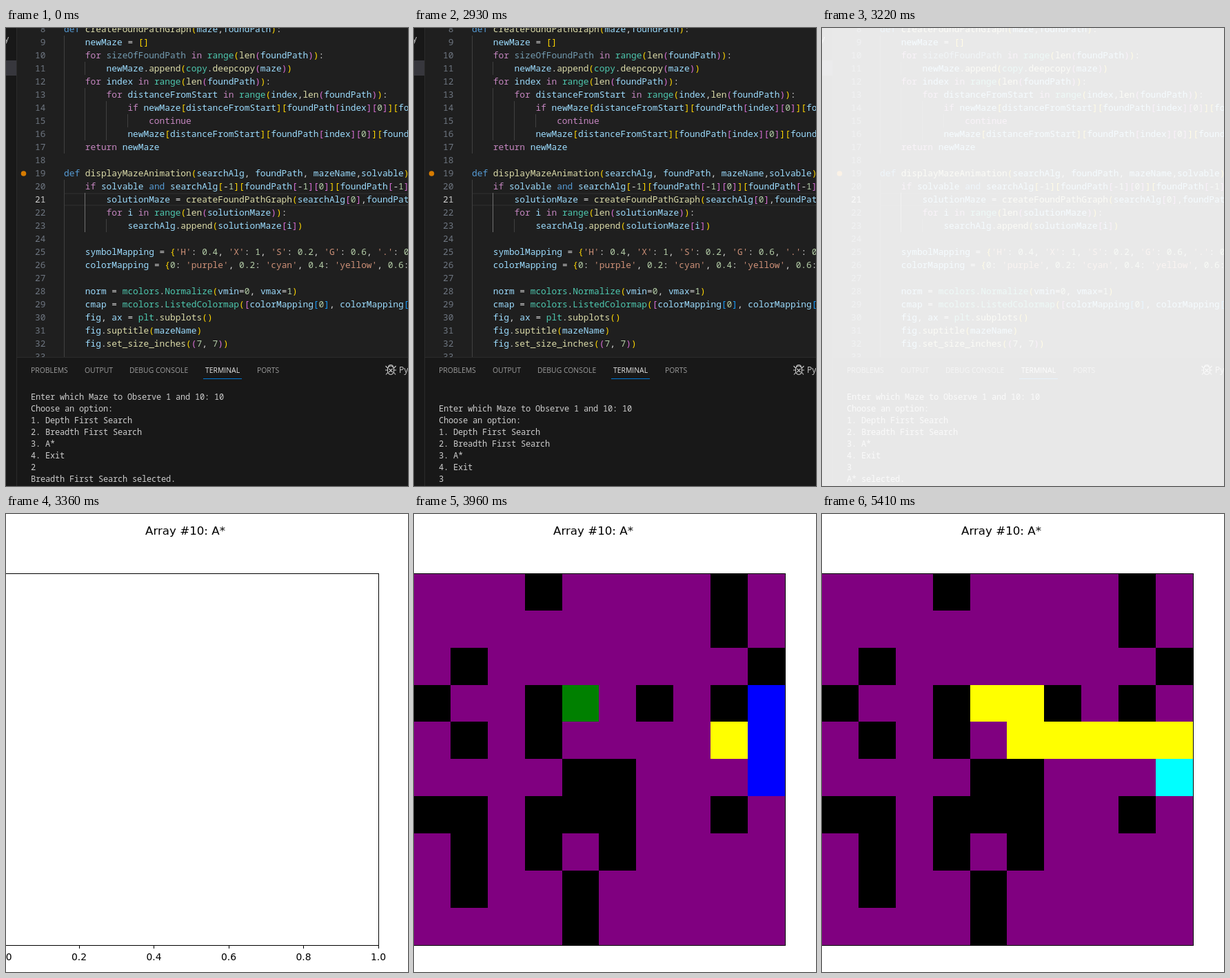
An HTML page for the animation above (6 s loop, 583 by 664 pixels).

```html
<!DOCTYPE html>
<html lang="en">
<head>
<meta charset="utf-8">
<title>Maze search</title>
<style>
  html, body { margin: 0; width: 100%; height: 100%; overflow: hidden; background: #1f1f1f; }
  svg { display: block; }
  text { white-space: pre; }
  .code { font: 12.83px "Noto Sans Mono", monospace; fill: #d4d4d4; }
  .num { fill: #6e7681; text-anchor: end; }
  .term { font: 12px "Noto Sans Mono", monospace; letter-spacing: -.2px; fill: #ccc; }
  .tab { font: 10.4px "Open Sans", "Noto Sans", sans-serif; fill: #9d9d9d; }
  .ui { font: 12px "Open Sans", "Noto Sans", sans-serif; fill: #ccc; }
  .plot { font: 13.89px "DejaVu Sans", sans-serif; text-anchor: middle; }
  .title { font-size: 16.67px; }
  rect { shape-rendering: crispEdges; }
</style>
</head>
<body>
<svg id="stage" width="583" height="664" viewBox="0 0 583 664"></svg>
<script>
const LOOP = 6000;
const stage = document.getElementById('stage');

function add(parent, tag, attrs = {}, content) {
  const el = document.createElementNS('http://www.w3.org/2000/svg', tag);
  for (const key in attrs) el.setAttribute(key, attrs[key]);
  if (content !== undefined) el.textContent = content;
  parent.append(el);
  return el;
}
const box = (parent, x, y, width, height, fill) =>
  add(parent, 'rect', { x, y, width, height, fill });
const label = (parent, cls, x, y, content) =>
  add(parent, 'text', { class: cls, x, y }, content);

// ---------- editor ----------
const FIRST_LINE = 8, LINE_H = 19, CODE_X = 84, INDENT = 30.8;
const code = `def createFoundPathGraph(maze,foundPath):
    newMaze = []
    for sizeOfFoundPath in range(len(foundPath)):
        newMaze.append(copy.deepcopy(maze))
    for index in range(len(foundPath)):
        for distanceFromStart in range(index,len(foundPath)):
            if newMaze[distanceFromStart][foundPath[index][0]][foundPath[index][1]]
                continue
            newMaze[distanceFromStart][foundPath[index][0]][foundPath[index][1]]
    return newMaze

def displayMazeAnimation(searchAlg, foundPath, mazeName,solvable):
    if solvable and searchAlg[-1][foundPath[-1][0]][foundPath[-1][1]]
        solutionMaze = createFoundPathGraph(searchAlg[0],foundPath)
        for i in range(len(solutionMaze)):
            searchAlg.append(solutionMaze[i])
    
    symbolMapping = {'H': 0.4, 'X': 1, 'S': 0.2, 'G': 0.6, '.': 0}
    colorMapping = {0: 'purple', 0.2: 'cyan', 0.4: 'yellow', 0.6: 'green'}
    
    norm = mcolors.Normalize(vmin=0, vmax=1)
    cmap = mcolors.ListedColormap([colorMapping[0], colorMapping[0.2]])
    fig, ax = plt.subplots()
    fig.suptitle(mazeName)
    fig.set_size_inches((7, 7))
    `.split('\n');

const BRACKETS = ['#ffd700', '#da70d6', '#179fff'];
const FLOW = /^(for|in|if|continue|return)$/;
const TYPES = /^(range|copy|mcolors|plt|Normalize|ListedColormap)$/;

function wordColor(word, next) {
  if (FLOW.test(word)) return '#c586c0';
  if (/^(def|and)$/.test(word)) return '#569cd6';
  if (TYPES.test(word)) return '#4ec9b0';
  if (word === 'sizeOfFoundPath') return '#739bb0';
  return next === '(' ? '#dcdcaa' : '#9cdcfe';
}

function writeCode(parent, line, y) {
  const row = label(parent, 'code', CODE_X, y);
  let depth = 0;
  for (const m of line.matchAll(/'[^']*'|[\d.]*\d|[A-Za-z_]\w*|[()[\]{}]|\s+|./g)) {
    const token = m[0];
    let fill = '#d4d4d4';
    if (token[0] === "'") fill = '#ce9178';
    else if (/\d$/.test(token) && /^[\d.]/.test(token)) fill = '#b5cea8';
    else if (/^\w/.test(token)) fill = wordColor(token, line[m.index + token.length]);
    else if (/[([{]/.test(token)) fill = BRACKETS[depth++ % 3];
    else if (/[)\]}]/.test(token)) fill = BRACKETS[--depth % 3];
    add(row, 'tspan', { fill }, token);
  }
}

function drawEditor() {
  const g = add(stage, 'g');
  box(g, 0, 0, 583, 664, '#1f1f1f');
  box(g, 84, 239, 499, 19, '#282828');
  box(g, 84, 241, 499, 15, '#1f1f1f');
  code.forEach((line, i) => {
    const n = FIRST_LINE + i, top = 11 + LINE_H * (n - 9);
    const depth = line.match(/^ */)[0].length / 4;
    for (let d = 0; d < depth; d++) {
      const active = d === 1 && n >= 21 && n <= 23;
      box(g, Math.floor(CODE_X + d * INDENT), top, 1, LINE_H, active ? '#707070' : '#404040');
    }
    const num = label(g, 'code num', 57.5, top + 14, n);
    if (n === 21) num.style.fill = '#ccc';
    writeCode(g, line, top + 14);
  });
  add(g, 'circle', { cx: 25.5, cy: 211, r: 3.8, fill: '#d67b00' });

  box(g, 0, 0, 15, 664, '#181818');
  box(g, 0, 47, 15, 22, '#37373d');
  box(g, 15, 0, 1, 664, '#2b2b2b');
  label(g, 'ui', -2, 20, 'y');

  box(g, 16, 477, 567, 187, '#181818');
  box(g, 16, 477, 567, 1, '#2b2b2b');
  [['PROBLEMS', 36], ['OUTPUT', 114], ['DEBUG CONSOLE', 179], ['TERMINAL', 289], ['PORTS', 364]]
    .forEach(([name, x]) => {
      const tab = label(g, 'tab', x, 500, name);
      if (name === 'TERMINAL') tab.style.fill = '#e7e7e7';
    });
  box(g, 286, 508, 56, 1, '#0078d4');
  add(g, 'path', {
    d: 'M553.5 495a4.5 5 0 0 1 9 0v2a4.5 5.5 0 0 1-9 0zM554.5 492a3.5 3.5 0 0 1 7 0' +
       'M553.5 493l-3-3M562.5 493l3-3M553.5 496h-3.5M562.5 496h3.5M554 499l-3 3.5M562 499l3 3.5' +
       'M555.5 494l5 5M560.5 494l-5 5',
    fill: 'none', stroke: '#ccc', 'stroke-width': 1.1
  });
  label(g, 'ui', 570, 500, 'Python');
}

// ---------- terminal ----------
const menu = ['Enter which Maze to Observe 1 and 10: 10', 'Choose an option:',
  '1. Depth First Search', '2. Breadth First Search', '3. A*', '4. Exit'];
const log = [...menu, '2', 'Breadth First Search selected.',
  'Displaying Array #10, Algorithm: Breadth First Search', '',
  ...menu, '3', 'A* selected.'];

drawEditor();
const rows = Array.from({ length: 8 }, (_, i) => label(stage, 'term', 36, 539 + 17 * i, ''));
const veil = box(stage, 0, 0, 583, 664, '#fff');

// ---------- plot ----------
const plot = add(stage, 'g', { class: 'plot' });
label(plot, 'title', 260, 30, 'Array #10: A*');

const frame = right => g => {
  box(g, 0, 86, right + 1, 1, '#000');
  box(g, 0, 625, right + 1, 1, '#000');
  box(g, right, 86, 1, 540, '#000');
};

const axes = add(plot, 'g');
frame(540)(axes);
for (let i = 0; i <= 5; i++) {
  const x = -2.5 + 108.5 * i;
  box(axes, Math.round(x - .5), 626, 1, 4, '#000');
  label(axes, '', x, 647, (i / 5).toFixed(1));
}

const maze = ['...X....X.', '........X.', '.X.......X', 'X..XG.X.X.', '.X.X......',
  '....XX...S', 'XX.XXX..X.', '.X.X.X....', '.X..X.....', '....X.....'];
const COLORS = { '.': '#800080', X: '#000', G: '#008000', S: '#0ff', H: '#ff0', V: '#00f' };
const START = '95';
// Cells as column + row
const visits = ['94', '93', '84', '74', '73', '64', '54'];
const path = ['94', '84', '74', '64', '54', '53', '43'];

const grid = add(plot, 'g');
const cells = {};
const edgeX = c => Math.floor(-.3 + 53.85 * c);
const edgeY = r => Math.floor(86.5 + 53.85 * r);
maze.forEach((line, r) => [...line].forEach((_, c) => {
  cells[`${c}${r}`] = box(grid, edgeX(c), edgeY(r),
    edgeX(c + 1) - edgeX(c), edgeY(r + 1) - edgeY(r));
}));
frame(538)(grid);

function paintMaze(step) {
  const marks = {};
  if (step > visits.length) {
    path.slice(0, step - visits.length - 1).forEach(id => marks[id] = 'H');
  } else if (step > 0) {
    [START, ...visits.slice(0, step - 1)].forEach(id => marks[id] = 'V');
    marks[visits[step - 1]] = 'H';
  }
  for (const id in cells)
    cells[id].setAttribute('fill', COLORS[marks[id] || maze[id[1]][id[0]]]);
}

// ---------- timeline ----------
const scrolls = [[0, 0], [200, 1], [270, 6], [2930, 9], [3000, 10]];
const fades = [[0, 0], [3150, .6], [3220, .9], [3290, 1]];
const PLOT_AT = 3360;
const mazeTimes = [3560, 3690, 3760, 3960, 4030, 4160, 4290, 4420,
  4620, 4750, 4820, 4950, 5020, 5150, 5280, 5410];

const valueAt = (table, t) => table.filter(([at]) => at <= t).pop()[1];

function render(t) {
  const top = valueAt(scrolls, t);
  rows.forEach((row, i) => row.textContent = log[top + i] || '');
  veil.setAttribute('opacity', valueAt(fades, t));
  plot.style.display = t >= PLOT_AT ? '' : 'none';
  const step = mazeTimes.filter(at => at <= t).length - 1;
  axes.style.display = step < 0 ? '' : 'none';
  grid.style.display = step < 0 ? 'none' : '';
  paintMaze(step);
}

const begin = performance.now();
function tick() {
  render((performance.now() - begin) % LOOP);
  requestAnimationFrame(tick);
}
tick();
</script>
</body>
</html>
```
